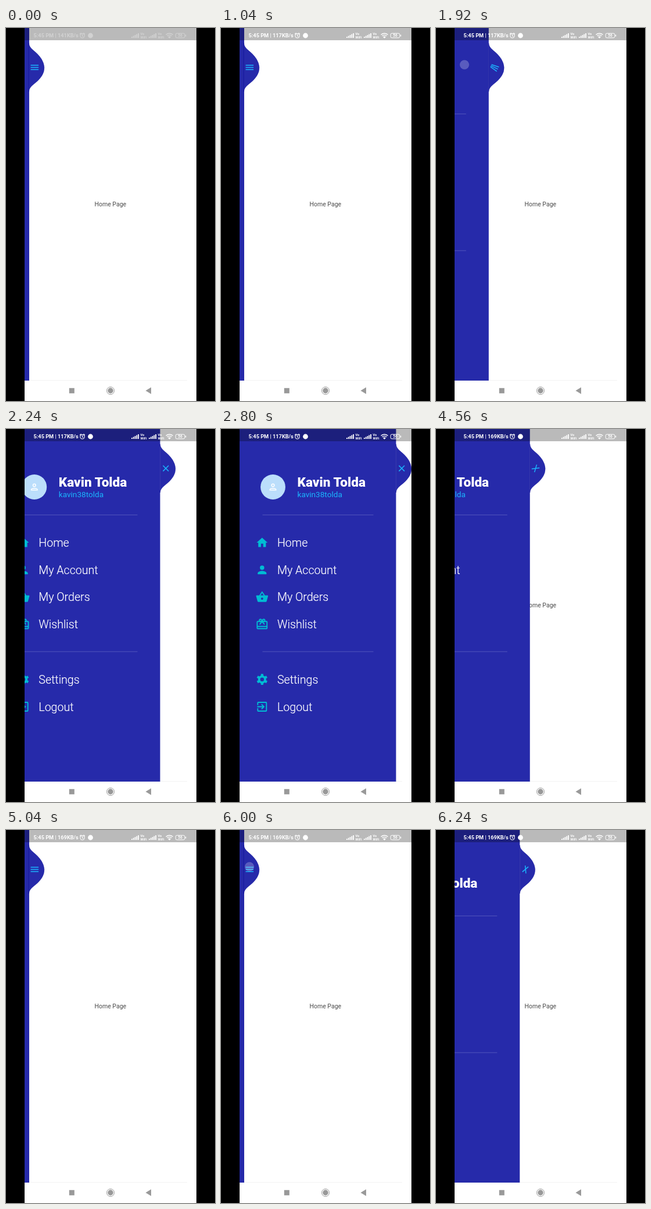
Animation, 360 px wide and 640 px high, one loop 6320 ms. Source, as an HTML page:

```html
<!DOCTYPE html>
<html lang="en">
<head>
<meta charset="utf-8">
<title>Collapsing sidebar</title>
<style>
html, body { margin: 0; width: 100%; height: 100%; overflow: hidden; background: #000; }
svg { display: block; width: 360px; height: 640px; font-family: Roboto, sans-serif; }
.line { fill: none; stroke: currentColor; stroke-width: 2; }
.menu text { font-size: 19.6px; font-weight: 300; fill: #fff; stroke: #fff; stroke-width: .2; }
.icon { color: #00bcd4; fill: #00bcd4; }
.tiny { font-size: 5.6px; font-weight: 700; }
</style>
</head>
<body>
<svg viewBox="0 0 360 640">
  <defs>
    <clipPath id="screen"><rect x="32" width="296" height="605"/></clipPath>
    <g id="signal">
      <path d="M0 17v-2h1.8v2zM2.8 17v-3.4h1.8v3.4zM5.6 17v-5h1.8v5zM8.4 17v-6.5h1.8v6.5zM11.2 17V9H13v8z"/>
      <text class="tiny" x="15.5" y="12.4">Vo</text>
      <text class="tiny" x="15.5" y="17.8">WiFi</text>
    </g>
  </defs>

  <rect x="32" width="296" height="640" fill="#fff"/>
  <path d="M32 604.5H312" stroke="#f3f3f3"/>
  <g clip-path="url(#screen)">
    <text x="152.5" y="306" font-size="10.5" fill="#4a4a4a">Home Page</text>
    <rect id="sheet" x="32" width="8" height="605" fill="#262aaa"/>
    <path id="rim" d="M39.2 0V605" stroke="#0c0c98"/>
    <g id="tab">
      <path d="M0 0Q0 8 10 16Q34 35 35 55Q36 75 10 94Q0 102 0 110z" fill="#262aaa" stroke="#0c0c98" stroke-opacity=".6"/>
      <g id="bars" transform="translate(13 55)" stroke="#1bb5fd" stroke-width="2">
        <path d="M-9 0H9"/><path d="M-9 0H9"/><path d="M-9 0H9"/>
      </g>
    </g>
    <g id="rules" stroke="#fff" stroke-opacity=".26" stroke-width=".8">
      <path/><path/>
    </g>
    <g id="content">
      <circle cx="89.5" cy="99.5" r="21.4" fill="#bbdefb"/>
      <g transform="translate(80.5 90.5) scale(.75)" color="#fff">
        <circle class="line" cx="12" cy="8" r="3.1"/>
        <path class="line" d="M5 19v-1c0-2 4.5-3 7-3s7 1 7 3v1z"/>
      </g>
      <text x="131.5" y="99.3" font-size="22.6" font-weight="800" fill="#fff">Kavin Tolda</text>
      <text x="131.5" y="117.3" font-size="13.6" fill="#1bb5fd">kavin38tolda</text>
      <g class="menu" id="menu"></g>
    </g>
  </g>

  <rect x="32" width="296" height="21" opacity=".27"/>
  <g id="status" fill="#fff" color="#fff">
    <text id="clock" x="47.5" y="16.4" font-size="9.2" font-weight="600"></text>
    <g class="line" style="stroke-width:1.1">
      <circle cx="131.5" cy="13.3" r="3.7"/>
      <path d="M131.5 11v2.6l1.7 1M127 10.5l2.6-2M136 10.5l-2.6-2"/>
    </g>
    <circle cx="145.5" cy="13" r="4.4"/>
    <use href="#signal" x="216"/>
    <use href="#signal" x="246"/>
    <g class="line" style="stroke-width:1.4">
      <path d="M275.5 11.5q6-4.6 12 0M277.6 13.6q3.9-3 7.8 0"/>
    </g>
    <path d="M279 15.2q2.5-1.8 5 0l-2.5 2.6z"/>
    <rect class="line" x="292.2" y="9.2" width="15.6" height="7.6" rx="2" style="stroke-width:1"/>
    <path d="M308.8 11.5h1.4v3h-1.4z"/>
    <text x="300" y="15.4" text-anchor="middle" font-size="6.4" font-weight="600">56</text>
  </g>

  <g fill="#999">
    <rect x="108.8" y="617.8" width="9" height="9"/>
    <circle cx="180" cy="622.3" r="4.7"/>
    <circle cx="180" cy="622.3" r="6.5" fill="none" stroke="#999"/>
    <path d="M240.5 622.3l9.5-5.8v11.6z"/>
  </g>
  <circle id="touch" cy="63" r="7.8" fill="#fff" fill-opacity=".24" stroke="#fff" stroke-opacity=".08"/>
</svg>

<script>
const LOOP = 6320, STEP = 80, SLIDE = 480;
const CLOSED = 39.5, TRAVEL = 262, SCREEN = 296, UNIT = .753;
// Finger down, then the slide begins on release.
const TAPS = [
  { down: 1760, slide: 1826, x: 49 },
  { down: 4240, slide: 4304, x: 311 },
  { down: 6000, slide: 6048, x: 49 }
];

const $ = id => document.getElementById(id);
const clamp = v => Math.min(1, Math.max(0, v));
const smooth = (v, a, b) => { const x = clamp((v - a) / (b - a)); return x * x * (3 - 2 * x); };
const set = (el, attrs) => { for (const k in attrs) el.setAttribute(k, attrs[k]); };

const teeth = [0, 60, 120].map(a =>
  `<path d="M12 2V7M12 17V22" stroke="currentColor" stroke-width="4.4" transform="rotate(${a} 12 12)"/>`).join('');
const items = [
  ['Home', 195, '<path d="M10 20v-6h4v6h5v-8h3L12 3 2 12h3v8z"/>'],
  ['My Account', 241.7, '<circle cx="12" cy="8" r="4"/><path d="M12 14c-2.67 0-8 1.34-8 4v2h16v-2c0-2.66-5.33-4-8-4z"/>'],
  ['My Orders', 288.3, '<path fill-rule="evenodd" d="M2 9H22Q23 9 23 10.2L20.4 19.6Q20 21 18.5 21H5.5Q4 21 3.6 19.6L1 10.2Q1 9 2 9zM12 13a2 2 0 1 0 .01 0z"/><path class="line" d="M7.5 9.6L12 3l4.5 6.6"/>'],
  ['Wishlist', 335, '<rect class="line" x="3" y="7" width="18" height="13" rx="1"/><path class="line" d="M3 16H21M7.5 12.5L12 7l4.5 5.5"/><circle class="line" cx="9" cy="5" r="2"/><circle class="line" cx="15" cy="5" r="2"/>'],
  ['Settings', 429.7, `<circle class="line" cx="12" cy="12" r="5.5" style="stroke-width:4"/>${teeth}`],
  ['Logout', 476.5, '<path class="line" d="M4 9V5Q4 4 5 4H19Q20 4 20 5V19Q20 20 19 20H5Q4 20 4 19V15M3 12H15M11 7.7L15.3 12 11 16.3"/>']
];
$('menu').innerHTML = items.map(([label, y, icon]) =>
  `<g class="icon" transform="translate(59.5 ${y - 11.3}) scale(.94)">${icon}</g><text x="97" y="${y + 7}">${label}</text>`).join('');

// Three bars turn half a circle while the outer two cross and the middle one fades.
function drawBars(p) {
  const turn = 180 * smooth(p, .05, .65);
  const spread = 45 * smooth(p, 0, .7);
  const gap = 5 * (1 - smooth(p, .1, .45));
  [-1, 0, 1].forEach((side, i) => set($('bars').children[i], {
    transform: `rotate(${turn}) translate(0 ${side * gap}) rotate(${side * spread})`,
    opacity: side ? 1 : clamp((.35 - p) / .15)
  }));
}

function draw(t) {
  const [open, close, reopen] = TAPS.map(tap => clamp((t - tap.slide) / SLIDE));
  const p = open - close + reopen;
  const edge = CLOSED + TRAVEL * p;
  const shift = SCREEN * (p - 1);

  set($('sheet'), { width: edge - 32 });
  set($('rim'), { opacity: p ? 0 : 1 });
  set($('tab'), { transform: `translate(${edge} 26.2) scale(${UNIT})` });
  drawBars(p);
  set($('content'), { transform: `translate(${shift} 0)` });
  [147.4, 382].forEach((y, i) =>
    set($('rules').children[i], { d: `M${71.5 + shift} ${y}H${edge - 39}` }));

  const speed = t < 1040 ? 141 : t < 4000 ? 117 : 169;
  $('clock').textContent = `5:45 PM | ${speed}KB/s`;
  set($('status'), { opacity: .35 + .65 * clamp((t - 80) / 240) });

  const tap = TAPS.find(({ down }) => t >= down && t < down + 200);
  set($('touch'), { cx: tap ? tap.x : 0, opacity: tap ? 1 : 0 });
}

const start = performance.now();
function tick() {
  const t = (performance.now() - start) % LOOP;
  draw(Math.floor(t / STEP) * STEP);
  requestAnimationFrame(tick);
}
tick();
</script>
</body>
</html>
```
